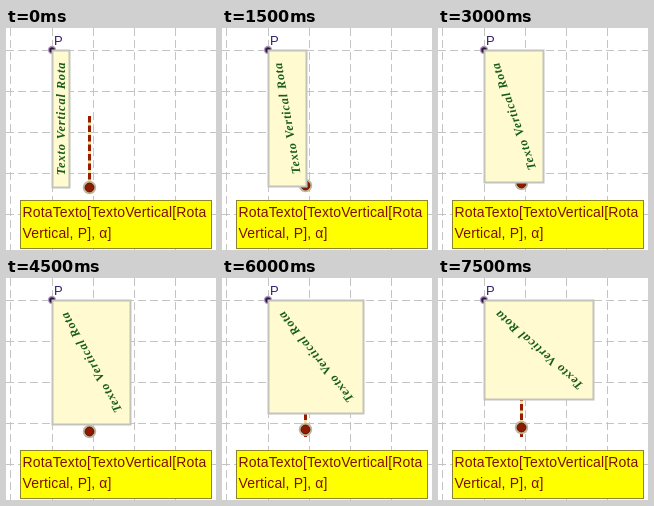
Write an HTML page that moves like this. It is 210x222 px and loops after 8 s.

```html
<!DOCTYPE html>
<html lang="es">
<head>
<meta charset="utf-8">
<title>Texto vertical que rota</title>
<style>
  html, body { margin: 0; width: 100%; height: 100%; overflow: hidden; background: #fff; }
  svg { display: block; width: 210px; height: 222px; }
  .grid { stroke: #c4c4c4; stroke-dasharray: 8 4; }
  .sans { font-family: "Liberation Sans", Arial, sans-serif; }
  .formula { font-size: 14px; letter-spacing: .15px; }
  .serif { font: italic bold 12.4px "Liberation Serif", "Times New Roman", serif; letter-spacing: .85px; }
</style>
</head>
<body>
<svg viewBox="0 0 210 222">
  <path class="grid" d="M4.5 0V222M46.5 0V222M87.5 0V222M128.5 0V222M169.5 0V222
    M0 22.5H210M0 63.5H210M0 104.5H210M0 145.5H210M0 186.5H210"/>

  <path d="M83.5 88V159" stroke="#f3dfa8" stroke-width="3"/>
  <path d="M83.5 88V159" stroke="#981c00" stroke-width="3" stroke-dasharray="6.5 3"/>
  <g id="knob">
    <circle r="6.7" fill="#c2b49a"/>
    <circle r="4.4" fill="#8f1a00" stroke="#4a1c0c"/>
  </g>

  <circle cx="46" cy="22" r="4.2" fill="#b49ac4"/>
  <circle cx="46" cy="22" r="2.8" fill="#2e1a3c"/>
  <text class="sans" x="48" y="17" font-size="13" fill="#35206c">P</text>

  <rect id="box" x="46.5" y="22.5" fill="#fffad0" stroke="#c3c3bd" stroke-width="2"/>
  <text id="label" class="serif" text-anchor="middle" y="3.6" fill="#175c1a">Texto Vertical Rota</text>

  <rect x="14.5" y="172.5" width="191" height="48" fill="#ff0" stroke="#8c8430"/>
  <g class="sans formula" fill="#7c1000">
    <text x="16.5" y="189">RotaTexto[TextoVertical[Rota</text>
    <text x="16.5" y="210">Vertical, P], α]</text>
  </g>
</svg>
<script>
const LOOP = 8000, HOLD = 1500, STEP_DEGREES = 9.7;
const TEXT_LENGTH = 126, TEXT_HEIGHT = 6, PADDING = 11;
const [knob, box, label] = ["knob", "box", "label"].map(id => document.getElementById(id));

function draw(now) {
  const step = Math.floor((now % LOOP) / HOLD);
  const degrees = step * STEP_DEGREES;
  const angle = degrees * Math.PI / 180;
  const sin = Math.sin(angle), cos = Math.cos(angle);

  // The frame is the upright bounding box of the rotated text.
  const width = Math.round(TEXT_LENGTH * sin + TEXT_HEIGHT * cos + PADDING);
  const height = Math.round(TEXT_LENGTH * cos + TEXT_HEIGHT * sin + PADDING);
  box.setAttribute("width", width);
  box.setAttribute("height", height);
  label.setAttribute("transform",
    `translate(${46.5 + width / 2} ${22 + height / 2}) rotate(${-90 - degrees})`);
  knob.setAttribute("transform", `translate(83.5 ${159.5 - 2 * step})`);
  requestAnimationFrame(draw);
}
requestAnimationFrame(draw);
</script>
</body>
</html>
```
